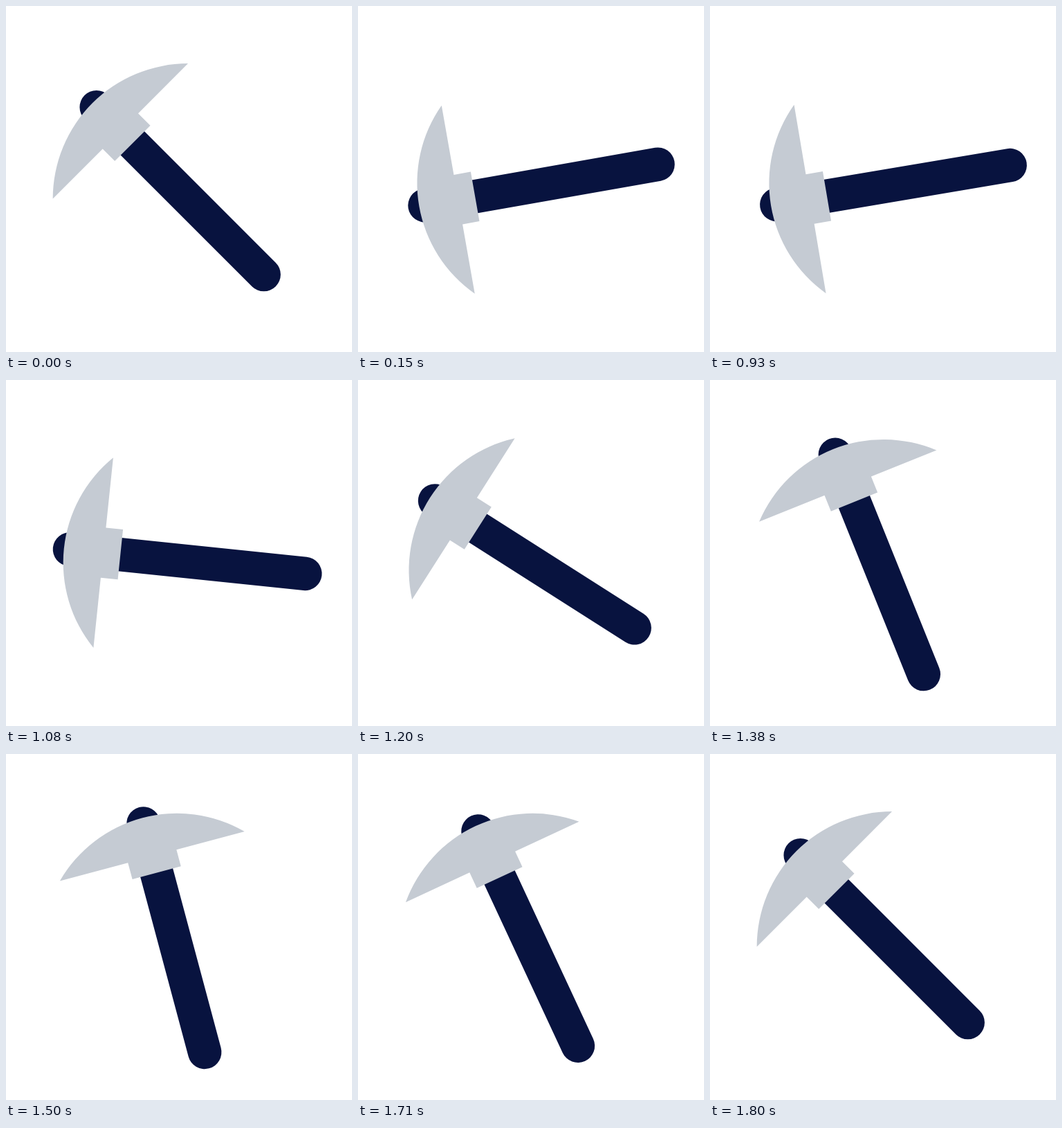
Recreate the animation shown at these times as an HTML page with a canvas. Size 500 px wide and 500 px high, loop 1830 ms.

```html
<!DOCTYPE html>
<html lang="en">
<head>
<meta charset="utf-8">
<title>Pickaxe</title>
<style>
  html, body { margin: 0; width: 100%; height: 100%; overflow: hidden; background: #fff; }
  canvas { display: block; width: 100vw; height: 100vh; }
</style>
</head>
<body>
<canvas id="stage"></canvas>
<script>
const SIZE = 500, LOOP = 1830, STEP = 30;
const NAVY = '#08133f', STEEL = '#c5cbd3';

// [time in ms, handle angle in degrees]
const KEYS = [[0, 45], [150, -10], [900, -10], [1500, 75], [1650, 75], [1800, 45], [LOOP, 45]];

const canvas = document.getElementById('stage');
const ctx = canvas.getContext('2d');

// cubic-bezier(.42, 0, .58, 1), solved by bisection
function easeInOut(p) {
  if (p <= 0 || p >= 1) return p <= 0 ? 0 : 1;
  let lo = 0, hi = 1, s = p;
  for (let i = 0; i < 30; i++) {
    s = (lo + hi) / 2;
    const x = 1.26 * s * (1 - s) ** 2 + 1.74 * s * s * (1 - s) + s ** 3;
    if (x < p) lo = s; else hi = s;
  }
  return s * s * (3 - 2 * s);
}

function angleAt(t) {
  const i = KEYS.findIndex(k => k[0] > t);
  const [t0, a0] = KEYS[i - 1], [t1, a1] = KEYS[i];
  return a0 + (a1 - a0) * easeInOut((t - t0) / (t1 - t0));
}

// The pickaxe lies along +x, head on the left, turning about the stage centre
function drawPick(angle) {
  const axis = 10.95;
  const capL = -157.7, capR = 184.3, r = 24.3;
  const back = -108.8, half = 138.15;
  const collarEnd = -84, collarHalf = 36.3;

  ctx.save();
  ctx.translate(SIZE / 2, SIZE / 2);
  ctx.rotate(angle * Math.PI / 180);
  ctx.translate(0, axis);

  ctx.fillStyle = NAVY;
  ctx.beginPath();
  ctx.arc(capL, 0, r, Math.PI / 2, Math.PI * 1.5);
  ctx.arc(capR, 0, r, -Math.PI / 2, Math.PI / 2);
  ctx.fill();

  ctx.fillStyle = STEEL;
  ctx.beginPath();
  ctx.arc(back + half, 0, half * Math.SQRT2, Math.PI * 0.75, Math.PI * 1.25);
  ctx.lineTo(back, -collarHalf);
  ctx.lineTo(collarEnd, -collarHalf);
  ctx.lineTo(collarEnd, collarHalf);
  ctx.lineTo(back, collarHalf);
  ctx.fill();

  ctx.restore();
}

function resize() {
  const dpr = window.devicePixelRatio || 1;
  canvas.width = Math.round(innerWidth * dpr);
  canvas.height = Math.round(innerHeight * dpr);
}

function render(t) {
  ctx.setTransform(canvas.width / SIZE, 0, 0, canvas.height / SIZE, 0, 0);
  ctx.fillStyle = '#fff';
  ctx.fillRect(0, 0, SIZE, SIZE);
  drawPick(angleAt(t));
}

let start = null;
function tick() {
  const now = performance.now();
  if (start === null) start = now;
  render(Math.floor(((now - start) % LOOP) / STEP) * STEP);
  requestAnimationFrame(tick);
}

addEventListener('resize', resize);
resize();
render(0);
requestAnimationFrame(tick);
</script>
</body>
</html>
```
